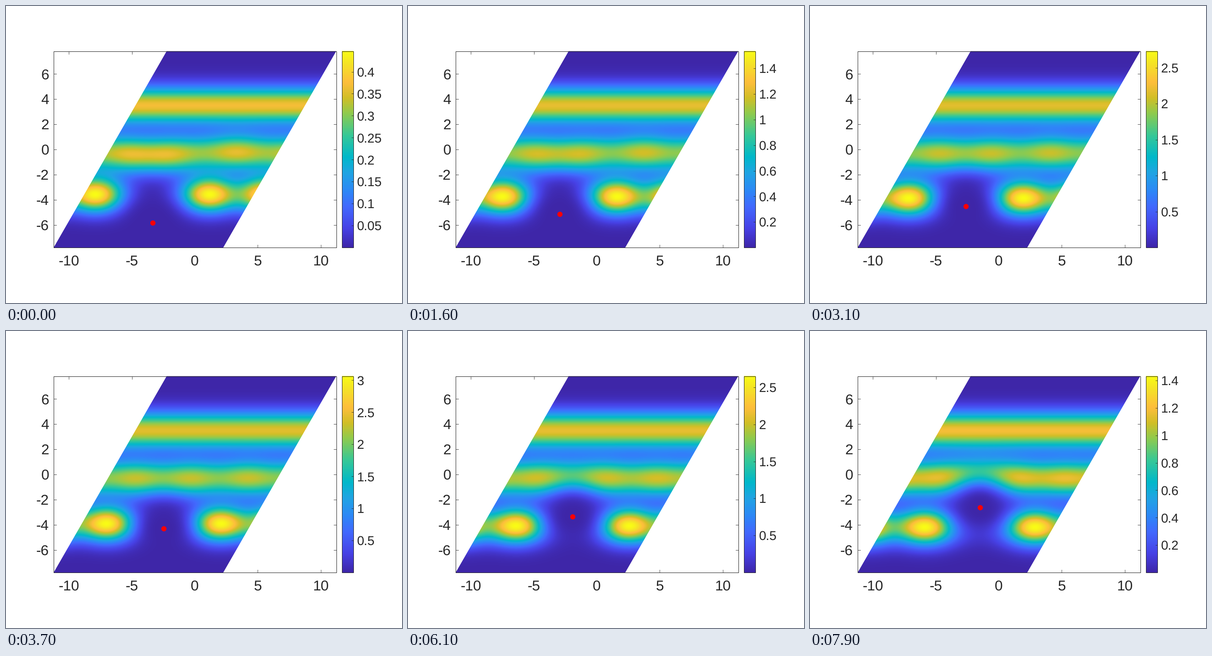
Write a matplotlib script that moves like this. It is 864 px wide and 648 px high and loops after 8000 ms.

```python
import numpy as np
import matplotlib.pyplot as plt
from matplotlib.animation import FuncAnimation
from matplotlib.colors import LinearSegmentedColormap
from matplotlib.patches import Polygon, Rectangle

plt.rcParams["text.hinting"] = "none"

W, H, DPI = 864, 648, 100
PX = 72 / DPI                                 # points per pixel
LEFT, RIGHT, TOP, BOTTOM = 104, 720.5, 98.5, 527
BAR_L, BAR_R = 732.5, 757.5
PERIOD = 370
UNIT, X0, Y0 = 27.47, 412, 313.2
STEPS = 27
INK = "#262626"

cmap = LinearSegmentedColormap.from_list("parula", [
    (0, "#3e26a8"), (0.095, "#4741e5"), (0.206, "#4269fe"), (0.286, "#2e87f7"),
    (0.381, "#20a5e3"), (0.460, "#01b8ca"), (0.571, "#37c897"), (0.683, "#8fcb4e"),
    (0.762, "#d1bf27"), (0.841, "#febe3c"), (0.937, "#f5e327"), (1, "#f9fb15")])

# The peak density rises and falls like a skewed bell: its logarithm is a quartic.
log_peak = np.poly1d(np.polyfit([0, 8, 13, 21, 27],
                                np.log([0.447, 2.032, 3.064, 2.652, 1.432]), 4))


def gauss(d, sigma):
    return np.exp(-d * d / (2 * sigma * sigma))


def wrapped(d):
    return (d + PERIOD / 2) % PERIOD - PERIOD / 2


def ring(x, center, sigma):
    """Gaussian repeated with the horizontal period."""
    d = wrapped(x - center)
    return gauss(d, sigma) + gauss(PERIOD - abs(d), sigma)


def dot_position(u):
    return 319.5 + 51 * u, 473.2 - 88.2 * u


xs = np.arange(LEFT, 721) + 0.5
ys = (np.arange(98, 527) + 0.5)[:, None]


def density(u):
    """Relative density at progress u: two bands, a row of blobs and a hole."""
    dot_x, dot_y = dot_position(u)
    dx = wrapped(xs - dot_x)
    ends = (2 * u - 1) ** 2

    upper = (0.8 + 0.035 * ends) * gauss(ys - 217, 27.8)

    lumps = (285 - 16 * (1 - u) ** 4, 355 + 98 * u, 503 + 53 * u)
    ridge = 0.61 + 0.05 * ends + 0.15 * sum(ring(xs, x, 38) for x in lumps)
    sag = 2.5 * (1 - u) ** 2 * np.cos(2 * np.pi * dx / PERIOD)
    lift = 7 * u ** 4 * gauss(dx, 50)
    middle = ridge * gauss(ys - 321.5 - sag + lift, 28)

    offset, width = 123 - 4 * u ** 4, 42 + 2 * u
    row = (ring(xs, dot_x - offset, width) + ring(xs, dot_x + offset, width)
           + 0.08 * u ** 4 * gauss(dx, 50))
    lower = row * gauss(ys - (411.5 + 21 * u - 4.5 * u * u), 26.5)

    r2 = dx ** 2 + (ys - dot_y) ** 2
    hole = 1 - np.exp(-(r2 / (2 * 42 ** 2)) ** 1.2)
    field = (upper + middle + lower) * hole
    return field / field.max()


def bar_spacing(top):
    return next(s for s in (0.05, 0.1, 0.2, 0.5) if top / s < 9.5)


fig = plt.figure(figsize=(W / DPI, H / DPI), dpi=DPI, facecolor="white")
ax = fig.add_axes([0, 0, 1, 1])
ax.axis("off")


def line(x, y):
    return ax.plot(x, y, color=INK, lw=0.8 * PX, zorder=1)[0]


def label(x, y, text, size, ha):
    return ax.text(x, y, text, fontsize=size * PX, family="Liberation Sans",
                   color=INK, ha=ha, va="baseline")


def show(data, extent, zorder):
    return ax.imshow(data, cmap=cmap, vmin=0, vmax=1, aspect="auto", extent=extent,
                     interpolation="nearest", zorder=zorder)


for value in range(-10, 11, 5):
    x = X0 + value * UNIT
    line([x, x], [BOTTOM, BOTTOM - 6])
    line([x, x], [TOP, TOP + 6])
    label(x, 566, str(value), 31.5, "center")
for value in range(-6, 7, 2):
    y = Y0 - value * UNIT
    line([LEFT, LEFT + 6], [y, y])
    line([RIGHT, RIGHT - 6], [y, y])
    label(94, y + 11, str(value), 31.5, "right")

picture = show(density(0), (LEFT, 721, BOTTOM, 98), 2)
picture.set_clip_path(Polygon([(LEFT, BOTTOM), (474, BOTTOM), (RIGHT, TOP), (350.5, TOP)],
                              transform=ax.transData))
show(np.linspace(1, 0, 256)[:, None], (BAR_L, BAR_R, BOTTOM, TOP), 0)
for left, right in ((LEFT, RIGHT), (BAR_L, BAR_R)):
    ax.add_patch(Rectangle((left, TOP), right - left, BOTTOM - TOP, fill=False,
                           ec=INK, lw=PX, zorder=3))

dot, = ax.plot([], [], "o", color="red", ms=11.4 * PX, mew=0, zorder=4)
bar_ticks = [(line([], []), label(766, 0, "", 28, "left")) for _ in range(10)]
ax.set_xlim(0, W)
ax.set_ylim(H, 0)


def update(frame):
    step = (frame + 2) // 3
    u = step / STEPS
    picture.set_data(density(u))
    x, y = dot_position(u)
    dot.set_data([x], [y])

    top = np.exp(log_peak(step))
    spacing = bar_spacing(top)
    for i, (tick, text) in enumerate(bar_ticks, 1):
        value = i * spacing
        tick.set_visible(value <= top)
        text.set_visible(value <= top)
        tick_y = BOTTOM - value / top * (BOTTOM - TOP)
        tick.set_data([BAR_R - 4, BAR_R], [tick_y, tick_y])
        text.set_y(tick_y + 10)
        text.set_text(f"{value:g}")
    return []


anim = FuncAnimation(fig, update, frames=80, interval=100, repeat=True,
                     repeat_delay=0, blit=False)
plt.show()
```
